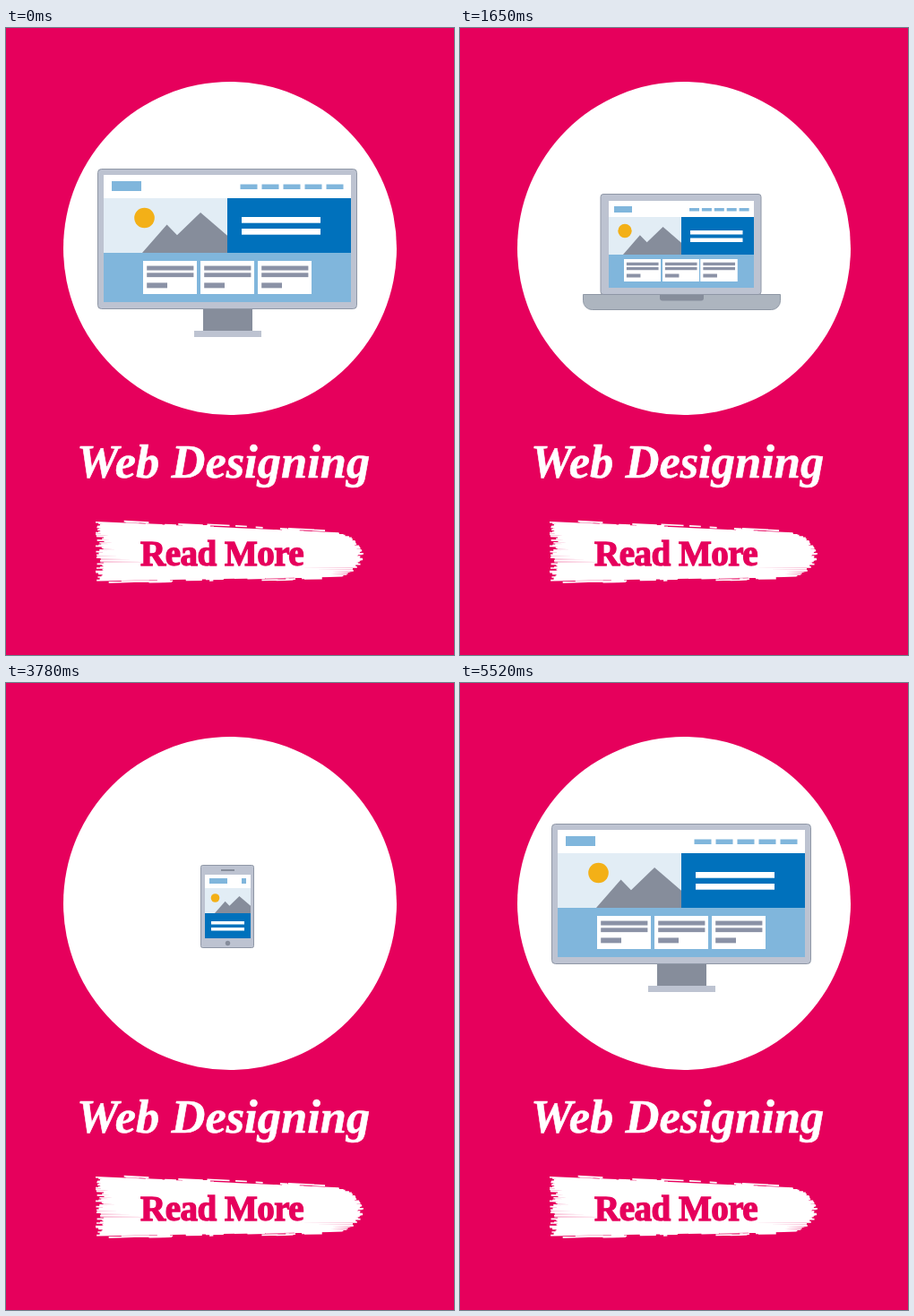
Recreate the animation shown at these times as an HTML page with a canvas. Size 500 px wide and 700 px high, loop 5.55 s.

```html
<!DOCTYPE html>
<html lang="en">
<head>
<meta charset="utf-8">
<title>Web Designing</title>
<style>
html, body { margin: 0; width: 100%; height: 100%; overflow: hidden; background: #e6005c; }
svg, canvas { position: absolute; left: 0; top: 0; width: 500px; height: 700px; }
text { font-family: "Liberation Serif", serif; font-weight: bold; }
</style>
</head>
<body>
<svg viewBox="0 0 500 700">
  <circle cx="250" cy="246" r="186" fill="#fff"/>
  <path id="brush" fill="none" stroke="#fff" stroke-width="1.7"/>
  <text x="79" y="502" font-size="52.5" font-style="italic" fill="#fff" stroke="#fff" stroke-width=".6">Web Designing</text>
  <text x="150" y="600" font-size="39" letter-spacing="-.5" fill="#e6005c" stroke="#e6005c" stroke-width="1.3">Read More</text>
</svg>
<canvas id="stage" width="500" height="700"></canvas>
<script>
const LOOP = 5550, STEP = 30;
const ctx = document.getElementById('stage').getContext('2d');

// Rectangles are x, y, w, h. body: centre, portrait size, angle, radius.
// nav: first item and spacing. line: first item and offset to the second.
// fade: page panel, nav, phone details, tablet details.
const desktop = {
  body: [247, 235.5, 157, 290, -90, 4], screen: [109, 164, 276, 142],
  img: [109, 190, 138, 61], hero: [247, 190, 138, 61], panel: [109, 251, 276, 55],
  logo: [118, 171, 33, 11], nav: [261.5, 174.5, 19, 5.5, 24], sun: [154.5, 212, 11.3],
  hills: [152, 206, 95, 45], line: [263, 211, 88, 6.7, 13],
  card: [60, 37], at: [153, 260, 217, 260, 281, 260, 281, 260],
  stand: [220, 314, 55, 24], base: [210, 338, 75, 7, 0], tint: [189, 195, 209],
  fade: [1, 1, 0, 0]
};
const laptop = {
  body: [246.5, 241.5, 113, 180, -90, 3], screen: [166, 193, 162, 97],
  img: [166, 211, 81, 42], hero: [247, 211, 81, 42], panel: [166, 253, 162, 37],
  logo: [172, 199, 20, 7], nav: [256, 201, 11, 3.5, 13.9], sun: [184, 226.5, 7.7],
  hills: [182, 222, 65, 31], line: [257, 226, 58.5, 4.5, 8.5],
  card: [41, 25], at: [183, 258, 226, 258, 268.5, 258, 268.5, 258],
  stand: [223, 298, 49, 6.5], base: [137.5, 297.5, 220, 17, 10], tint: [173, 181, 191],
  fade: [1, 1, 0, 0]
};
const tablet = {
  body: [247.5, 250.5, 93, 119, 0, 3], screen: [208.5, 199, 77.5, 95],
  img: [208.5, 215, 50.5, 27], hero: [259, 215, 27, 27], panel: [208.5, 242, 77.5, 52],
  logo: [213.5, 204.5, 16, 5], nav: [236, 206, 7, 2.3, 9.5], sun: [220, 225, 5],
  hills: [219, 222, 40, 20], line: [263, 221.5, 18, 2.5, 5.5],
  card: [32.5, 19], at: [213.5, 247, 248.5, 247, 213.5, 270, 248.5, 270],
  stand: [237, 290, 20, 7], base: [210, 292, 75, 10, 4], tint: [189, 195, 209],
  fade: [1, 1, 0, 1]
};
const phone = {
  body: [247, 249.5, 60, 93, 0, 2], screen: [222, 214, 51, 71],
  img: [222, 229, 51, 28], hero: [222, 257, 51, 28], panel: [222, 285, 51, 0],
  logo: [227, 218, 20, 6], nav: [240, 219, 4, 3, 6], sun: [233.5, 240, 4.8],
  hills: [233, 238, 40, 19], line: [229, 266, 37, 3.5, 7],
  card: [20, 8], at: [225, 277, 248, 277, 225, 277, 248, 277],
  stand: [237, 280, 20, 4], base: [230, 285, 35, 5, 0], tint: [189, 195, 209],
  fade: [0, 0, 1, 0]
};

const easeOut = p => Math.sin(p * Math.PI / 2);
const stages = [
  { start: 30, steps: 19, from: desktop, to: laptop, ease: p => p ** 1.25 },
  { start: 1770, steps: 11, from: laptop, to: tablet, ease: easeOut },
  { start: 3510, steps: 10, from: tablet, to: phone, ease: easeOut },
  { start: 5160, steps: 13, from: phone, to: desktop, ease: easeOut }
];

const mix = (a, b, p) => a.map((v, i) => v + (b[i] - v) * p);

function poseAt(time) {
  const t = Math.floor(time % LOOP / STEP) * STEP;
  const stage = stages.filter(s => s.start <= t).pop();
  if (!stage) return desktop;
  const { start, steps, from, to, ease } = stage;
  const p = ease(Math.min(1, ((t - start) / STEP + 1) / steps));
  const pose = {};
  for (const key in from) pose[key] = mix(from[key], to[key], p);
  // The laptop's keyboard unfolds before the lid has finished shrinking.
  if (to === laptop) {
    const q = Math.min(1, p * 1.65);
    for (const key of ['base', 'stand', 'tint']) pose[key] = mix(from[key], to[key], q);
  }
  return pose;
}

function rect(color, [x, y, w, h], alpha = 1) {
  ctx.globalAlpha = alpha;
  ctx.fillStyle = color;
  ctx.fillRect(x, y, w, h);
  ctx.globalAlpha = 1;
}

function rounded(fill, x, y, w, h, radii, edge) {
  ctx.beginPath();
  ctx.roundRect(x, y, w, h, radii);
  ctx.fillStyle = fill;
  ctx.fill();
  if (edge) {
    ctx.strokeStyle = edge;
    ctx.stroke();
  }
}

function drawHardware(s) {
  const [bx, by, bw, bh, br] = s.base;
  const unfolded = br > 2;
  if (unfolded) rounded(`rgb(${s.tint})`, bx, by, bw, bh, [0, 0, br, br], '#8f98a5');
  else rect('#bdc3d1', s.base);
  const [sx, sy, sw, sh] = s.stand;
  rounded('#868d9b', sx, sy, sw, sh, unfolded ? [0, 0, 3, 3] : 0);

  const [cx, cy, w, h, angle, r] = s.body;
  ctx.save();
  ctx.translate(cx, cy);
  ctx.rotate(angle * Math.PI / 180);
  rounded('#bdc3d1', .5 - w / 2, .5 - h / 2, w - 1, h - 1, r, '#8f97a6');
  ctx.restore();
}

function drawCard(x, y, w, h, alpha) {
  rect('#fff', [x, y, w, h], alpha);
  for (const [top, width, height] of [[.15, .87, .135], [.36, .87, .13], [.66, .38, .16]])
    rect('#8b92a6', [x + w * .07, y + h * top, w * width, h * height], alpha);
}

function drawPage(s, [page, nav, mobile, slate]) {
  rect('#fff', s.screen);
  rect('#80b6dc', s.panel, page);
  for (let i = 0; i < 8; i += 2) drawCard(s.at[i], s.at[i + 1], ...s.card, page);
  rect('#e2edf5', s.img);
  rect('#0071bc', s.hero);
  rect('#80b6dc', s.logo);

  const [nx, ny, nw, nh, gap] = s.nav;
  for (let i = 0; i < 5; i++) rect('#80b6dc', [nx + gap * i, ny, nw, nh], nav);

  const [x, y, w, h] = s.hills;
  ctx.beginPath();
  for (const [u, v] of [[0, 1], [.29, .3], [.41, .56], [.685, 0], [1, .57], [1, 1]])
    ctx.lineTo(x + u * w, y + v * h);
  ctx.fillStyle = '#868d9b';
  ctx.fill();
  dot('#f3b017', ...s.sun);

  const [lx, ly, lw, lh, drop] = s.line;
  rect('#fff', [lx, ly, lw, lh]);
  rect('#fff', [lx, ly + drop, lw, lh]);
  rect('#80b6dc', [lx, ly + 2 * drop - .5, lw, lh], slate);

  rect('#80b6dc', [263, 218, 5, 6], mobile);
  rect('#868d9b', [240, 208, 15, 2], mobile);
  ctx.globalAlpha = mobile;
  dot('#868d9b', 247.5, 290.5, 2.7);
  ctx.globalAlpha = 1;
  rect('#aab0bd', [237, 297.5, 20, 7], slate);
}

function dot(color, x, y, r) {
  ctx.beginPath();
  ctx.arc(x, y, r, 0, 7);
  ctx.fillStyle = color;
  ctx.fill();
}

function paintBrush() {
  let seed = 11;
  const rnd = () => (seed = seed * 16807 % 2147483647) / 2147483647;
  let d = '';
  const hair = (v, x1, x2) => {
    const y = x => 552 + v * 65 + (x - 105) / 285 * (13 - v * 18);
    d += `M${x1} ${y(x1)}L${x2} ${y(x2)}`;
  };
  for (let v = 0; v <= 1; v += .014)
    hair(v, 100 + rnd() * 10, 372 + 23 * Math.sin(Math.PI * v) ** .6 + rnd() * 8 - 4);
  // Loose bristles along both edges
  for (let i = 0; i < 34; i++) {
    const x = 108 + rnd() * 245, spread = rnd() * .055;
    hair(i % 2 ? 1 + spread : -spread, x, x + 4 + rnd() * 28);
  }
  document.getElementById('brush').setAttribute('d', d);
}

function frame(now) {
  const pose = poseAt(now - begin);
  ctx.clearRect(0, 0, 500, 700);
  drawHardware(pose);
  drawPage(pose, pose.fade.map(a => a * a * (3 - 2 * a)));
  requestAnimationFrame(frame);
}

paintBrush();
const begin = 0;
frame(performance.now());
</script>
</body>
</html>
```
